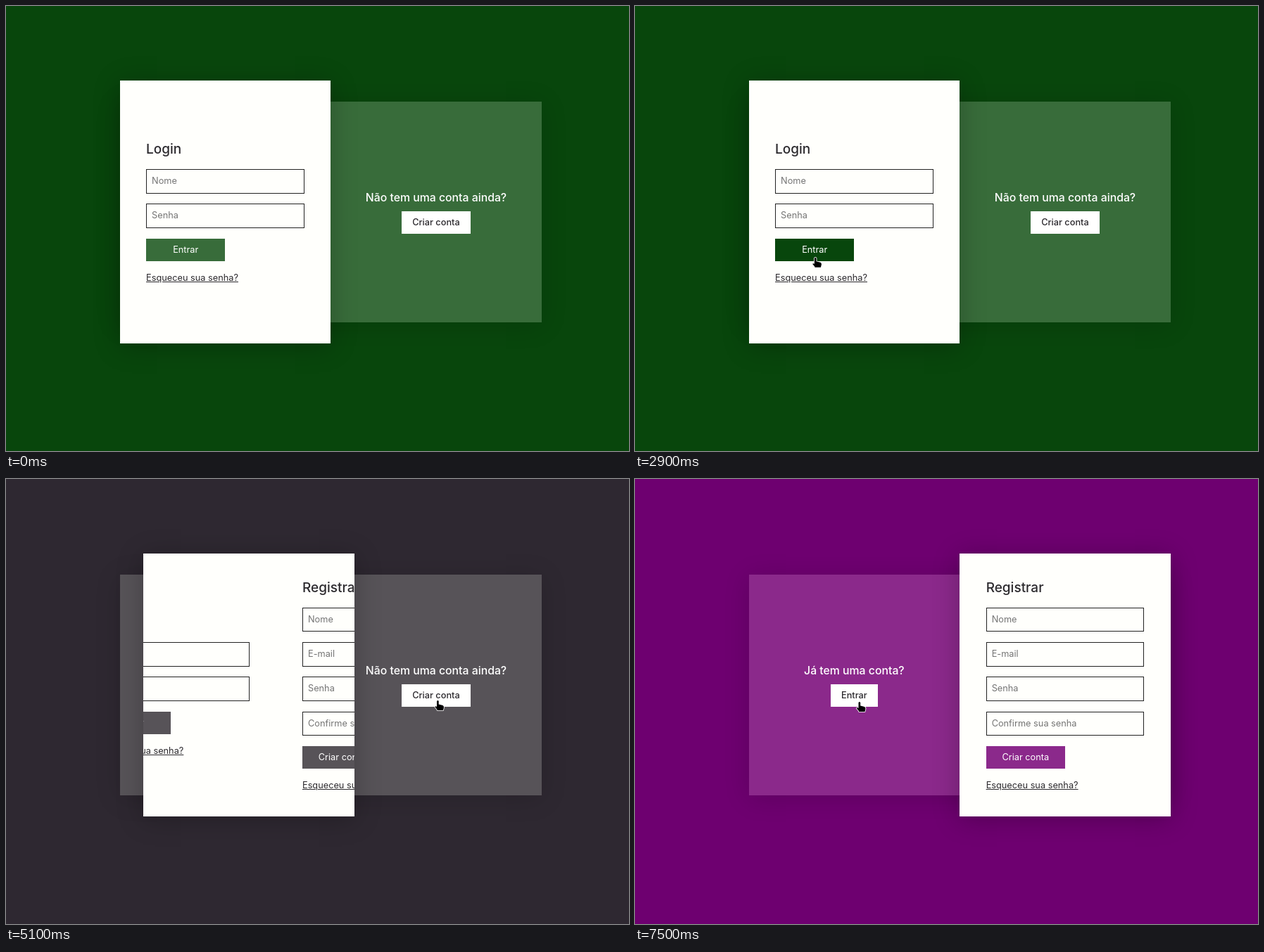
An HTML page that plays this animation: 885x633 px, repeating every 8000 ms.

```html
<!DOCTYPE html>
<html lang="pt">
<head>
<meta charset="utf-8">
<title>Login</title>
<style>
  html, body { margin: 0; width: 100%; height: 100%; overflow: hidden; }
  body { background: var(--bg); font: 12.75px Inter, sans-serif; color: #2c2a2e; cursor: default; }
  div { position: absolute; box-sizing: border-box; white-space: nowrap; }
  .panel { background: var(--panel); box-shadow: 0 4px 34px rgba(0,0,0,.15); }
  .card { background: #fffffc; box-shadow: 0 4px 34px rgba(0,0,0,.25); overflow: hidden; }
  .title { font-size: 19px; font-weight: 500; }
  .ask { font-size: 15.8px; font-weight: 500; color: #fff; text-align: center; }
  .field { border: 1px solid #222; padding-left: 7px; color: #757575; }
  .btn { text-align: center; }
  .white { background: #fffffe; font-weight: 500; }
  .submit { background: var(--submit); color: #fff; }
  .link { text-decoration: underline; }
  svg { position: absolute; left: 0; top: 0; overflow: visible; pointer-events: none; }
  svg path { stroke: #fff; stroke-width: 1.6; stroke-linejoin: round; paint-order: stroke; }
</style>
</head>
<body>
<script>
const LOOP = 8000;
const SCALE = .749, HALF = 400 * SCALE, TALL = 500 * SCALE, PAD = 50 * SCALE;

function box(cls, x, y, w, h, content = '', id = '') {
  const line = cls === 'field' ? h - 2 : h;
  return `<div class="${cls}" id="${id}" style="left:${x}px;top:${y}px;width:${w}px;height:${h}px;line-height:${line}px">${content}</div>`;
}

// The rows of a form run down from its first field.
function form(id, first, title, fields, submit) {
  const width = HALF - 2 * PAD, step = 49.2, end = first + fields.length * step;
  return box('form', 0, 0, HALF, TALL,
    box('title', PAD, first - 42, width, 28, title) +
    fields.map((name, i) => box('field', PAD, first + i * step, width, 34.25, name)).join('') +
    box('btn submit', PAD, end, width / 2, 32.2, submit) +
    box('link', PAD, end + 48, 130, 16, 'Esqueceu sua senha?'), id);
}

function side(x, question, answer, width) {
  return box('ask', x, 156, HALF, 22, question) +
    box('btn white', x + (HALF - width) / 2, 186.3, width, 32, answer);
}

document.body.innerHTML =
  box('stage', 161.6, 105.7, 2 * HALF, TALL,
    box('panel', 0, 40 * SCALE, 2 * HALF, 420 * SCALE) +
    side(0, 'Já tem uma conta?', 'Entrar', 67) +
    side(HALF, 'Não tem uma conta ainda?', 'Criar conta', 98) +
    box('card', 0, 0, HALF, TALL,
      form('login', 126.6, 'Login', ['Nome', 'Senha'], 'Entrar') +
      form('register', 77.4, 'Registrar', ['Nome', 'E-mail', 'Senha', 'Confirme sua senha'], 'Criar conta'),
      'card')) +
  '<svg width="1" height="1"><path id="pointer"/></svg>';

const [card, login, register, pointer] =
  ['card', 'login', 'register', 'pointer'].map(id => document.getElementById(id));

const SHAPES = {
  arrow: 'M0 0V13.5L3.2 10.8L5.5 16L7.6 15L5.4 10H9.5Z',
  hand: 'M-1.5 0Q0 -2 1.2 0V4.5L7 6Q9 7 8.4 9.5L7.5 13H-1V12L-4 8.5Q-4 6.5 -1.5 8Z',
  beam: 'M-3 -7H3V-6H.6V7H3V8H-3V7H-.6V-6H-3Z'
};

// The purple lies outside the screen's gamut, so its green channel clips at zero.
const GREEN = { bg: [8, 70, 12], panel: [56, 108, 58] };
const PURPLE = { bg: [110, -10, 112], panel: [139, 41, 139] };

// Pointer moves: start, end, and the place where each one comes to rest
const ENTRY = [186, 63];
const MOVES = [
  [400, 1200, 272, 325], [1200, 1800, 257, 346], [2800, 3400, 255, 388],
  [3800, 3900, 447, 391], [3900, 4600, 613.5, 316],
  [5900, 6400, 552, 406], [6400, 6700, 678, 396],
  [6800, 7100, 320, 339], [7200, 7500, 319, 318]
];

const span = (t, from, length) => Math.min(1, Math.max(0, (t - from) / length));
const mix = (a, b, k) => a.map((v, i) => v + (b[i] - v) * k);
const rgb = c => `rgb(${c.map(v => Math.max(0, Math.round(v)))})`;
const easeOut = p => 1 - (1 - p) ** 2;

function bezier(x1, y1, x2, y2) {
  const at = (a, b, s) => 3 * a * s * (1 - s) ** 2 + 3 * b * s * s * (1 - s) + s ** 3;
  return x => {
    if (x <= 0 || x >= 1) return x;
    let lo = 0, hi = 1;
    for (let i = 0; i < 24; i++) {
      const mid = (lo + hi) / 2;
      if (at(x1, x2, mid) < x) lo = mid; else hi = mid;
    }
    return at(y1, y2, hi);
  };
}
const ease = bezier(.25, .1, .25, 1), easeInOut = bezier(.42, 0, .58, 1);

function hover(t, enter, leave) {
  const shown = ease(span(Math.min(t, leave), enter, 500));
  return shown * (1 - ease(span(t, leave, 500)));
}

function drawPointer(t) {
  pointer.style.display = t < MOVES[0][0] ? 'none' : '';
  const spot = MOVES.reduce((at, [from, to, ...rest]) =>
    mix(at, rest, easeOut(span(t, from, to - from))), ENTRY);
  const under = document.elementFromPoint(...spot);
  const is = selector => under && under.matches(selector);
  const kind = is('.btn, .link') ? 'hand' : is('.field') ? 'beam' : 'arrow';
  pointer.setAttribute('d', SHAPES[kind]);
  pointer.setAttribute('transform', `translate(${spot})`);
}

function draw(time) {
  // The screen updates ten times a second.
  const t = Math.floor(time % LOOP / 100) * 100;
  const progress = span(t, 5030, 300);
  const k = ease(progress);

  const bg = mix(GREEN.bg, PURPLE.bg, k), panel = mix(GREEN.panel, PURPLE.panel, k);
  const pressed = Math.max(hover(t, 1300, 2900), hover(t, 6200, 6500));
  const style = document.documentElement.style;
  style.setProperty('--bg', rgb(bg));
  style.setProperty('--panel', rgb(panel));
  style.setProperty('--submit', rgb(mix(panel, bg, pressed)));

  card.style.left = HALF * easeInOut(progress) + 'px';
  login.style.left = -HALF * k + 'px';
  register.style.left = HALF * (1 - k) + 'px';
  drawPointer(t);
}

const start = performance.now();
function tick() {
  draw(performance.now() - start);
  requestAnimationFrame(tick);
}
tick();
</script>
</body>
</html>
```
